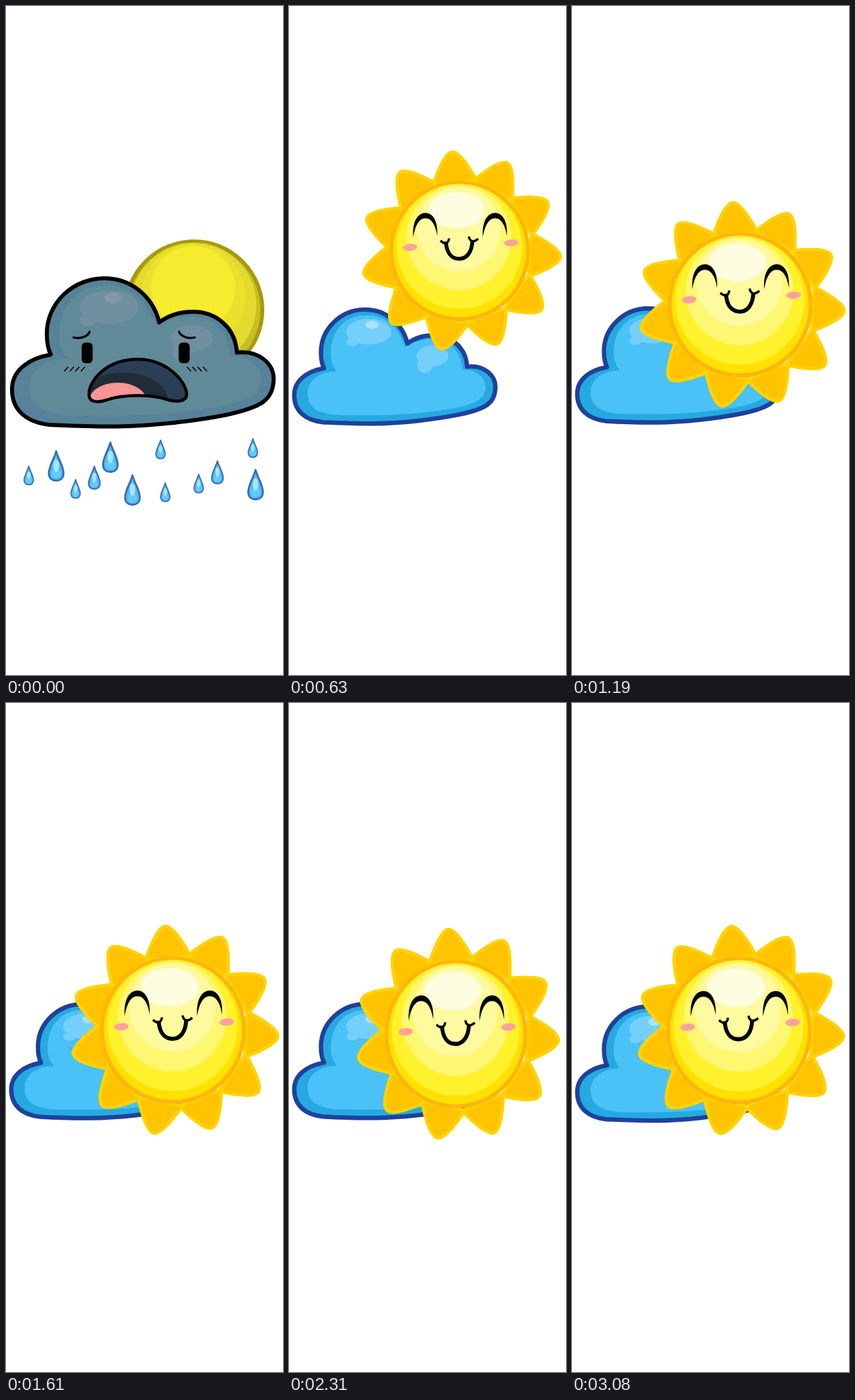
Animation of 414x1000 px, one loop 3150 ms. Source, as an HTML page:

```html
<!DOCTYPE html>
<html lang="en">
<head>
<meta charset="utf-8">
<title>Rain to sunshine</title>
<style>
  html, body { margin: 0; width: 100%; height: 100%; overflow: hidden; background: #fff; }
  svg { display: block; width: 100%; height: 100%; }
</style>
</head>
<body>
<svg viewBox="0 0 414 1000">
  <defs>
    <path id="cloudShape" d="M67 521C61 510 61 497 61 490A86 83 0 0 1 147 407C185 407 219 432 229 473C243 462 260 457 280 457C313 457 343 480 345 518C378 514 400 535 400 557C400 590 380 600 330 611C280 621 215 628 165 628.5C130 629 90 627 65 626C30 622 9 604 9 573C9 545 33 527 67 521Z"/>
    <path id="cloudBody" d="M92 527C82 515 80 505 80 492C80 450 105 418 150 418C185 418 212 440 224 480C238 470 258 464 280 464C307 464 332 484 336 524C364 522 381 540 381 558C381 585 350 594 300 602C230 613 160 613 100 612C60 611 35 600 35 570C35 545 58 527 92 527Z"/>
    <path id="mouth" d="M124 582C123 560 150 528 197 528C240 528 268 560 270 579C271 592 255 592 243 589C220 580 175 580 150 589C138 593 125 593 124 582Z"/>
    <clipPath id="mouthClip"><use href="#mouth"/></clipPath>
    <g id="drop">
      <path d="M0 1.5C3 13 11 24 11 34.5C11 42 6 45.5 0 45.5C-6 45.5-11 42-11 34.5C-11 24-3 13 0 1.5Z" fill="#4dbdf2" stroke="#3f68b2" stroke-width="2.8" stroke-linejoin="round"/>
      <circle cy="35" r="7" fill="#62cbf8"/>
      <ellipse cy="23" rx="4.3" ry="9.5" fill="#a3e6fd"/>
    </g>
    <g id="rain"></g>
    <path id="ray" d="M-34-108C-24-131-11-156 0-156C11-156 24-131 34-108Z" fill="#ffc300" stroke="#ffd300" stroke-width="5"/>
    <path id="eye" d="M177 468C175 444 184 430 196 430C207 430 216 442 214.5 466C212 450 206 438.500 196 438.500C186 438.500 180 450 177 468Z"/>
  </defs>
  <g id="dull">
    <use id="oldRain" href="#rain"/>
    <use id="newRain" href="#rain"/>
    <g id="dullSun"></g>
    <g id="dullCloud"></g>
  </g>
  <g id="bright">
    <g id="brightCloud"></g>
    <g id="brightSun"></g>
  </g>
</svg>
<script>
const LOOP = 3150, STEP = 70, CHANGE = 630, LAND = 1470, REST = 3080;
const $ = id => document.getElementById(id);
const set = (id, name, value) => $(id).setAttribute(name, value);

// Sun artwork is drawn around this point.
const CX = 249.5, CY = 489.5;

const disc = (ring, base, ...shades) => `
  <circle cx="${CX}" cy="${CY}" r="107" fill="${base}" stroke="${ring}" stroke-width="6"/>` +
  shades.map((shade, i) =>
    `<circle cx="${CX - (i + 1) / 2}" cy="${CY - 7 - i * 13.5}" r="${98 - i * 16}" fill="${shade}"/>`).join("");

const cloud = (line, width, rim, body, shine, glint) => `
  <use href="#cloudShape" fill="${rim}"/>
  <use href="#cloudBody" fill="${body}"/>
  <g fill="${shine}">
    <ellipse cx="154" cy="450" rx="44" ry="25"/><ellipse cx="122" cy="470" rx="12" ry="8"/>
    <ellipse cx="278" cy="497" rx="31" ry="20"/><circle cx="263" cy="515" r="15"/>
  </g>
  <ellipse cx="160" cy="436.5" rx="13" ry="8" fill="${glint}"/>
  <use href="#cloudShape" fill="none" stroke="${line}" stroke-width="${width}" stroke-linejoin="round"/>`;

const blushLines = [0, 1, 2, 3].map(i =>
  `M${92.5 + i * 8.3} 540l-5 5.5M${271 + i * 8} 540l5 5.5`).join("");

const sadFace = `
  <g id="sadFace">
    <rect x="113" y="503" width="16.5" height="31" rx="6"/>
    <rect x="258" y="503" width="16.5" height="31" rx="6"/>
    <g fill="none" stroke="#000" stroke-linecap="round">
      <path d="M101 495.5C112 498 122 494 125 487M258.5 487C262 494 271 498 282 495.5" stroke-width="3.2"/>
      <path d="${blushLines}" stroke-width="1.7"/>
    </g>
    <g clip-path="url(#mouthClip)">
      <use href="#mouth" fill="#2a3e55"/>
      <ellipse cx="175" cy="592" rx="68" ry="44" fill="#202c37"/>
      <ellipse cx="167" cy="590" rx="43" ry="27" fill="#fb9495"/>
    </g>
    <use href="#mouth" fill="none" stroke="#000" stroke-width="4.5"/>
  </g>`;

const cheek = (x, y) =>
  `<ellipse rx="11" ry="5.5" fill="#ffa0a0" transform="translate(${x} ${y}) rotate(-4)"/>`;

const happyFace = `
  <g id="happyFace">
    <use href="#eye"/><use href="#eye" x="109"/>
    <g fill="none" stroke="#000">
      <path d="M228 475C229 493 237 502 249 502C261 502 269 491 269.5 473" stroke-width="6"/>
      <path d="M219.5 473.5C226 480 232 478 233 470M264 467C265 475 272 477 278.5 470.5" stroke-width="3.5"/>
    </g>
    ${cheek(172, 484)}${cheek(330.5, 477)}
  </g>`;

const rays = Array.from({ length: 11 }, (_, i) =>
  `<use href="#ray" transform="translate(${CX + 2} ${CY + .5}) rotate(${-5 + i * 360 / 11})"/>`).join("");

const BIG = 1, MEDIUM = .77, SMALL = .63;
const drop = (x, y, size) =>
  `<use href="#drop" transform="translate(${x} ${y}) scale(${size})"/>`;
const trio = (x, y) => drop(x, y, MEDIUM) + drop(x - 28, y + 20, SMALL) + drop(x + 57, y + 13, BIG);

// Two equal trios with single drops scattered between them
$("rain").innerHTML = trio(132, 687) + trio(316, 679) +
  drop(75, 664, BIG) + drop(156, 651, BIG) + drop(34, 687, SMALL) +
  drop(231, 648, SMALL) + drop(238, 712, SMALL) + drop(369, 646, SMALL);

$("dullSun").innerHTML = disc("#a99a06", "#c7bf26", "#e3da2e", "#ebe02e", "#f6eb2e");
$("dullCloud").innerHTML = cloud("#000", 6, "#568399", "#618a99", "#708f9f", "#8099a5") + sadFace;
$("brightCloud").innerHTML = cloud("#1f419b", 8.5, "#26a9e1", "#4ac1f7", "#74d0fa", "#a8e1fc");
$("brightSun").innerHTML = rays + disc("#ffb50d", "#ffe100", "#fff12c", "#fff671", "#fff99f") +
  `<ellipse cx="245" cy="425.5" rx="44" ry="28.5" fill="#fffde0"/>` + happyFace;

const progress = (t, start, end) => Math.min(1, Math.max(0, (t - start) / (end - start)));
const arc = p => Math.sin(Math.PI * p);

function draw(t) {
  const rise = progress(t, 0, CHANGE);
  const fall = progress(t, CHANGE, LAND);
  const sway = arc(.9 * progress(t, LAND, REST));
  const bob = arc(progress(t, 910, REST));

  const x = 281 - 26 * rise - 5.5 * fall;
  const y = 454 - 88 * rise + 121 * fall + 8 * sway;
  const sun = (sx, sy) => `translate(${x} ${y}) scale(${sx} ${sy}) translate(${-CX} ${-CY})`;
  const cloudMove = `translate(${6 - rise / 2} ${404 + 47.5 * rise - 4.3 * bob}) scale(${1 - .231 * rise}) translate(-6 -404)`;

  set("dull", "display", rise < 1 ? "inline" : "none");
  set("bright", "opacity", progress(t, 420, CHANGE));

  set("oldRain", "transform", `translate(0 ${25.5 * rise})`);
  set("oldRain", "opacity", 1 - rise);
  set("newRain", "transform", `translate(0 ${119 * (1 - rise)}) scale(1 ${.4 + .6 * rise})`);
  set("newRain", "opacity", rise);

  const dullScale = .955 + .061 * rise;
  set("dullSun", "transform", sun(dullScale, dullScale));
  set("dullCloud", "transform", cloudMove);
  set("sadFace", "opacity", 1 - rise);

  const size = .955 + .045 * fall;
  set("brightCloud", "transform", cloudMove);
  set("brightSun", "transform", sun(size - .029 * sway, size + .01 * sway));
  set("happyFace", "transform", `translate(0 ${2 * sway - 2.5 * arc(fall)})`);
}

function tick() {
  draw(Math.floor(performance.now() % LOOP / STEP) * STEP);
  requestAnimationFrame(tick);
}
tick();
</script>
</body>
</html>
```
